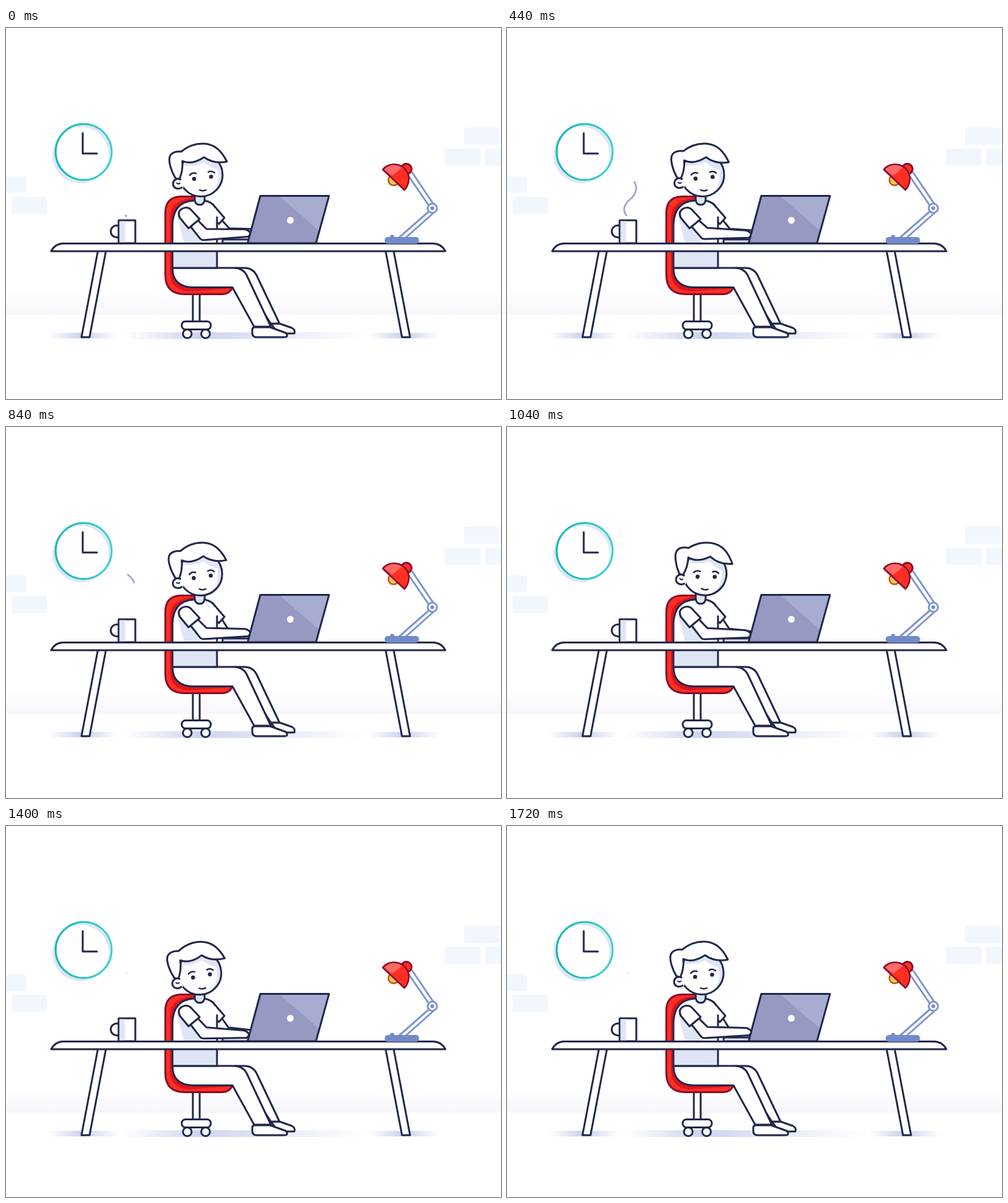
Animation of 800x600 px, one loop 1760 ms. Source, as an HTML page:

```html
<!DOCTYPE html>
<html lang="en">
<head>
<meta charset="utf-8">
<title>Working at a desk</title>
<style>
  html, body { margin: 0; width: 100%; height: 100%; overflow: hidden; background: #fff; }
  svg { display: block; width: 100vw; height: 100vh; }
  .ink { stroke: #20274a; stroke-width: 3; stroke-linejoin: round; stroke-linecap: round; fill: #fff; }
  .line { fill: none; }
  .shade { fill: #dfe5f5; }
  .brick { fill: #f2f6fd; }
  .metal { fill: none; stroke: #7f94d0; stroke-width: 3; }
  .red { fill: #ff2f22; stroke: #8a0a2c; stroke-width: 3; stroke-linejoin: round; }
</style>
</head>
<body>
<svg viewBox="0 0 800 600">
  <defs>
    <linearGradient id="wall" x2="0" y2="1">
      <stop stop-color="#fff"/><stop offset="1" stop-color="#f6f6fc"/>
    </linearGradient>
    <linearGradient id="shadow">
      <stop stop-color="#cbd3ee" stop-opacity="0"/>
      <stop offset=".5" stop-color="#c6cfec"/>
      <stop offset="1" stop-color="#cbd3ee" stop-opacity="0"/>
    </linearGradient>
    <linearGradient id="wideShadow">
      <stop stop-color="#d3daf1" stop-opacity="0"/>
      <stop offset=".31" stop-color="#ccd4ee"/>
      <stop offset="1" stop-color="#d3daf1" stop-opacity="0"/>
    </linearGradient>
    <linearGradient id="teal">
      <stop stop-color="#0bb9b4"/><stop offset="1" stop-color="#3fd2ce"/>
    </linearGradient>
    <clipPath id="dial"><circle cx="125.5" cy="200.5" r="45"/></clipPath>
    <clipPath id="face"><circle cx="315" cy="237.5" r="35"/></clipPath>
  </defs>

  <!-- room -->
  <rect y="425" width="800" height="39" fill="url(#wall)"/>
  <g class="brick">
    <rect x="-20" y="240" width="52" height="27" rx="4"/>
    <rect x="9" y="273" width="57" height="28" rx="4"/>
    <rect x="740" y="161" width="58" height="28" rx="4"/>
    <rect x="709" y="195" width="58" height="28" rx="4"/>
    <rect x="774" y="195" width="58" height="28" rx="4"/>
  </g>
  <rect x="68" y="493" width="112" height="9" fill="url(#shadow)"/>
  <rect x="190" y="492" width="392" height="11" fill="url(#wideShadow)"/>
  <rect x="586" y="493" width="114" height="9" fill="url(#shadow)"/>

  <!-- clock -->
  <circle class="shade" cx="121" cy="205" r="46"/>
  <circle class="shade" cx="125.5" cy="200.5" r="45"/>
  <circle cx="121" cy="205" r="45" fill="#fff" clip-path="url(#dial)"/>
  <circle cx="125.5" cy="200.5" r="45.3" fill="none" stroke="url(#teal)" stroke-width="3"/>
  <path class="ink line" d="M124 170V203H147"/>

  <!-- desk legs -->
  <path class="ink" d="M149 358H162L135 500H122ZM613 358H626L653 500H640Z"/>

  <!-- chair -->
  <rect class="ink" x="302" y="428" width="11" height="48"/>
  <circle class="ink" cx="293" cy="494.500" r="7"/>
  <circle class="ink" cx="322.500" cy="494.500" r="7"/>
  <rect class="ink" x="284" y="474.500" width="47" height="13" rx="6"/>
  <path class="red" d="M310 272.500H283Q257.500 273 257.500 299V400Q258 430.500 289 430.500H350Q361 430 366 420L300 400Z"/>
  <path fill="#dd1420" d="M310 274Q265 276 265 306V395Q266 424 294 426L366 421L290 395V290Z"/>

  <!-- legs -->
  <path class="ink" d="M428 478H442L462 485Q468 488 466 494H440Z"/>
  <path class="ink" d="M370 388H385Q399 388 405 400L442 478H428Z"/>
  <path class="ink" d="M269 388H368Q383 388 389 400L428 483H401L366 419.500H301Q269 418 269 388Z"/>
  <path class="ink" d="M402 484H427L452 493Q458 500 449 500H405Q398 500 398 493V488Q398 484 402 484Z"/>

  <!-- back arm and body -->
  <path class="ink line" id="backArm"/>
  <path class="ink" d="M334 285L353 307L344 317L336 310Z"/>
  <path fill="#fff" d="M269 388V318Q270 279 305 279H318Q341 282 341 305V388Z"/>
  <path class="shade" d="M276 302L288 348H316L300 325ZM270 361H340V387H270Z"/>
  <path class="ink line" d="M269 388V318Q270 281 304 279M321 279Q334 282 338 290M341 306V388H269"/>
  <path class="ink" style="fill:#dfe5f5" d="M305 270V278Q306 286 313 286Q320 286 321 278V270Z"/>

  <!-- head -->
  <g id="head">
    <circle cx="315" cy="237.500" r="35" fill="#fff"/>
    <path class="shade" clip-path="url(#face)" d="M284 212H354V275H322Q348 258 342 229Q330 226 320 217Q302 226 285 222Z"/>
    <circle class="ink line" cx="315" cy="237.500" r="35"/>
    <path class="ink" d="M274 243C266 230 262 214 265 207C268 201 276 199 283 200C295 190 308 186.500 320 187C337 188 348 198 357 216C343 219 330 216 320 209C308 217 296 220 285 215C286 227 284 236 280 245Z"/>
    <path fill="#fff" d="M277 244H284L287 258L280 260Z"/>
    <path class="ink" d="M282 245C275 242 270 247 270 252C270 259 278 262 284 258"/>
    <path class="ink line" stroke-width="2" d="M276 251Q279 253 281 251" style="stroke-width:2"/>
    <g fill="#20274a"><circle cx="304" cy="244" r="3.300"/><circle cx="331.500" cy="240.500" r="3.300"/></g>
    <path class="ink line" style="stroke-width:2.500" d="M297 238Q301 233 307 235M327 233Q332 230 337 234M313 262Q318 264.500 323 262"/>
  </g>

  <!-- front arm and laptop -->
  <rect class="ink shade" style="fill:#dfe5f5" x="350" y="342" width="50" height="6"/>
  <path class="ink" id="foreArm"/>
  <path class="ink" d="M295 324L281 307Q276 297 285 292Q294 288 300 295L313 309Z"/>
  <path class="ink" style="fill:#9799c2" d="M411 271.500H522L501 348H390.500Z"/>
  <path fill="#a6add0" d="M443 273H520L505 327Z"/>
  <circle cx="459.500" cy="311" r="5.500" fill="#fff"/>

  <!-- desk top -->
  <path class="ink" d="M92 348.500H690Q704 349 710 361H73Q79 349 92 348.500Z"/>

  <!-- mug and steam -->
  <path class="ink" d="M182 319.500C165 317 165 341 182 338.500"/>
  <rect class="ink" x="182" y="311" width="27" height="37"/>
  <rect class="shade" x="183.500" y="312.500" width="9" height="34"/>
  <path id="steam" pathLength="1" fill="none" stroke="#a0a2ca" stroke-width="2.700" d="M195 305C186 296 188 286 199 277C211 267 214 252 196 238"/>
  <path id="speck" stroke="#a9abc0" d="M195 239L197 237"/>

  <!-- lamp -->
  <path class="metal" d="M634 340L683 297M645 340L691 299M649 237L684 288M656 233L691 285"/>
  <circle cx="624" cy="338" r="3.500" fill="#738ac9"/>
  <rect x="612" y="338" width="55.500" height="11" rx="5" fill="#738ac9"/>
  <circle class="metal" cx="689" cy="291.500" r="7.500" style="fill:#fff"/>
  <circle cx="689" cy="291.500" r="3" fill="#738ac9"/>
  <circle cx="626.500" cy="246" r="8.500" fill="#ffcb55" stroke="#c94a14" stroke-width="2.500"/>
  <circle class="red" cx="647" cy="228" r="8.500"/>
  <path class="red" style="stroke-width:2.500" d="M609 229C616 219 634 217 644 227C654 237 653 252 644 262Z"/>
  <path fill="#ff6a68" d="M611.500 229C617 221 630 219 640 226L624 239Z"/>
</svg>
<script>
  const LOOP = 1760, FRAME = 40, TAP = 120;
  const el = id => document.getElementById(id);
  const mix = (a, b, k) => a + (b - a) * k;
  const ease = (t, from, to) => {
    const k = Math.min(1, Math.max(0, (t - from) / (to - from)));
    return k * k * (3 - 2 * k);
  };

  // Typing poses: [elbow shift, front hand shift, back hand shift]
  const poses = { rest: [0, 0, 7], start: [0, -1, 0], lean: [-5, 4, 7], press: [1, 6, 4], half: [0, 2, 2] };
  const taps = "start press lean lean start press start rest press rest half rest press rest rest rest".split(" ");

  function drawArms(t) {
    const i = Math.floor(t / TAP), k = (t % TAP) / TAP;
    const [elbow, hand, back] = poses[taps[i]].map((v, n) => mix(v, poses[taps[i + 1]][n], k));
    const tipX = 395 - Math.max(0, hand) * 0.6;
    el("foreArm").setAttribute("d",
      `M299 322L314 ${341 + elbow}Q316 ${343 + elbow} 319 ${343 + elbow}` +
      `L${tipX - 4} ${338.5 + hand}Q${tipX} ${337 + hand} ${tipX} ${332 + hand}` +
      `Q${tipX - 4} ${327 + hand} ${tipX - 10} ${326.5 + hand}L324 ${325 + elbow}L311 312`);
    el("backArm").setAttribute("d", `M349 311L${361 - back / 3} ${324 + back / 3}L397 ${325 + back}`);
  }

  function draw(t) {
    const swing = 7.2 * (Math.sin(2 * Math.PI * t / 860 - 0.14) + 0.14);
    el("head").setAttribute("transform", `rotate(${swing} 320 273)`);
    drawArms(t);

    const tail = ease(t, 383, 1050), tip = ease(t, -90, 630);
    el("steam").setAttribute("stroke-dasharray", `0 ${tail} ${tip - tail} 2`);
    el("steam").style.display = tail < 1 ? "" : "none";
    el("speck").style.display = tail < 1 ? "none" : "";
  }

  const begin = performance.now();
  function tick() {
    const t = (performance.now() - begin) % LOOP;
    draw(Math.floor(t / FRAME) * FRAME);
    requestAnimationFrame(tick);
  }
  draw(0);
  requestAnimationFrame(tick);
</script>
</body>
</html>
```
